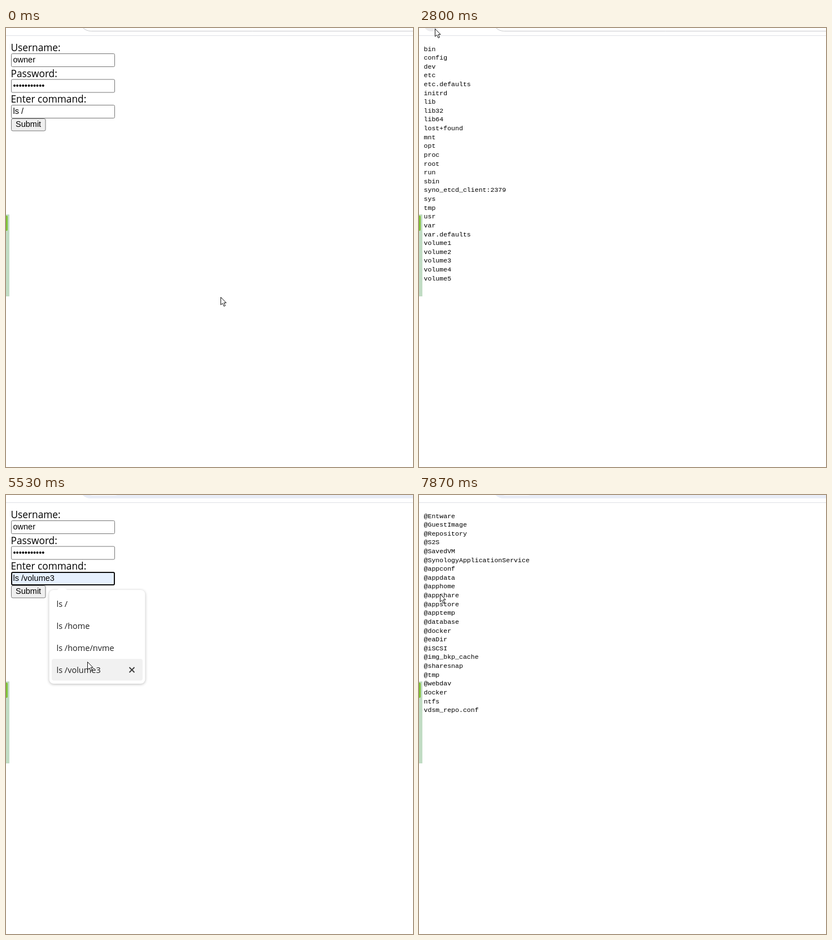
Animation, 721 px wide and 777 px high, one loop 8 s. Source, as an HTML page with a canvas:

```html
<!DOCTYPE html>
<html lang="en">
<head>
<meta charset="utf-8">
<title>Remote command form</title>
<style>
  html, body { margin: 0; width: 721px; height: 777px; overflow: hidden; background: #fff; }
  canvas { display: block; }
</style>
</head>
<body>
<canvas width="721" height="777"></canvas>
<script>
const ctx = document.querySelector('canvas').getContext('2d');
const LOOP = 8000;
const LABEL = '17.3px "Open Sans", sans-serif';
const MENU = '14.5px "Open Sans", sans-serif';
const FIELD = '14.5px "Liberation Sans", sans-serif';
const LISTING = '11.57px "Liberation Mono", monospace';

const rootListing = `bin config dev etc etc.defaults initrd lib lib32 lib64 lost+found mnt opt
  proc root run sbin syno_etcd_client:2379 sys tmp usr var var.defaults
  volume1 volume2 volume3 volume4 volume5`.split(/\s+/);
const volumeListing = `@Entware @GuestImage @Repository @S2S @SavedVM @SynologyApplicationService
  @appconf @appdata @apphome @appshare @appstore @apptemp @database @docker @eaDir @iSCSI
  @img_bkp_cache @sharesnap @tmp @webdav docker ntfs vdsm_repo.conf`.split(/\s+/);
const suggestions = ['ls /', 'ls /home', 'ls /home/nvme', 'ls /volume3'];

// Pointer stops: time, x, y
const pointerPath = [
  [0, 380, 476], [530, 37, 168], [800, 37, 168], [870, 40, 168], [1670, 40, 168],
  [1870, 75, 278], [2070, 60, 64], [2730, 60, 64], [2800, 28, 1], [2930, 28, 1],
  [3200, 110, 87], [3330, 110, 87], [3600, 100, 101], [3730, 98, 116], [3870, 98, 116],
  [4130, 104, 150], [5000, 104, 150], [5530, 144, 295], [5870, 140, 315], [6130, 140, 315],
  [6530, 36, 177], [6870, 36, 177], [6930, 37, 175], [LOOP, 37, 175]
];

function pointerAt(t) {
  const i = pointerPath.findIndex(stop => stop[0] > t);
  const [t0, x0, y0] = pointerPath[i - 1], [t1, x1, y1] = pointerPath[i];
  const u = (t - t0) / (t1 - t0), ease = u * u * (3 - 2 * u);
  return [x0 + (x1 - x0) * ease, y0 + (y1 - y0) * ease];
}

function text(string, x, y, font, color = '#000') {
  ctx.font = font;
  ctx.fillStyle = color;
  ctx.fillText(string, x, y);
}

function box(x, y, w, h, radius, fill, stroke, lineWidth = 1) {
  ctx.beginPath();
  ctx.roundRect(x, y, w, h, radius);
  if (fill) { ctx.fillStyle = fill; ctx.fill(); }
  if (stroke) { ctx.strokeStyle = stroke; ctx.lineWidth = lineWidth; ctx.stroke(); }
}

function drawChrome(t) {
  if (t >= 2800 && t < 3070) box(8, -22, 28, 28, 14, '#ececee');
  if (t < 2930) {
    box(130.5, -40, 700, 45.5, 20, '#fff', '#c8c9cc');
  } else {
    box(130, -40, 700, 46, 20, '#e9edf7');
    box(140, -28, 66, 29, 14, '#fff');
  }
  box(0, 13, 721, 1, 0, '#dfe1e5');
  box(0, 330, 6, 145, 0, '#c1dcc4');
  box(-4, 332, 7, 27, 2, '#80c337');
}

function drawField(y, value, focused, fill = '#fff', caret = false) {
  if (focused) box(10, y + 1, 182, 22, 2, fill, '#101010', 2);
  else box(9.5, y + .5, 183, 23, 2, fill, '#767676');
  text(value, 12.5, y + 16, FIELD);
  if (caret) box(13 + ctx.measureText(value).width, y + 3, 1, 17, 0, '#000');
}

function drawMenu(alpha, hovered) {
  ctx.save();
  ctx.globalAlpha = alpha;
  ctx.shadowColor = 'rgba(0,0,0,.28)';
  ctx.shadowBlur = 5;
  ctx.shadowOffsetY = 1;
  box(76.5, 168, 170, 166, 8, '#fff');
  ctx.shadowColor = 'transparent';
  ctx.beginPath();
  ctx.moveTo(91, 168);
  ctx.lineTo(99.5, 160);
  ctx.lineTo(108, 168);
  ctx.fill();
  suggestions.forEach((command, i) => {
    const top = 173 + 39 * i;
    if (i === hovered) {
      box(81, top, 161, 38.5, 4, '#f1f1f1');
      const y = top + 19.5;
      ctx.beginPath();
      ctx.moveTo(218.5, y - 4.5); ctx.lineTo(227.5, y + 4.5);
      ctx.moveTo(227.5, y - 4.5); ctx.lineTo(218.5, y + 4.5);
      ctx.strokeStyle = '#3c3c3c';
      ctx.lineWidth = 1.8;
      ctx.stroke();
    }
    text(command, 89.5, top + 25, MENU, '#1f1f1f');
  });
  ctx.restore();
}

function drawForm(t, [px, py]) {
  const menuOpen = t >= 4270 && t < 6200;
  const hovered = menuOpen && py >= 173 ? Math.floor((py - 173) / 39) : -1;
  const chosen = t >= 6200;
  const passwordEmpty = t >= 2930 && t < 3870;
  const passwordFocused = t >= 3530 && t < 4270;
  const commandFocused = t >= 4270 || (t >= 300 && t < 670);
  const command = hovered >= 0 ? suggestions[hovered] : chosen ? suggestions[3] : 'ls /';

  text('Username:', 8.5, 41, LABEL);
  drawField(45, 'owner');
  text('Password:', 8.5, 87, LABEL);
  drawField(90.5, passwordEmpty ? '' : '•'.repeat(11), passwordFocused, '#fff', passwordFocused && t < 4030);
  text('Enter command:', 8.5, 132, LABEL);
  const caretOn = (t >= 6200 && t < 6730) || (t >= 7230 && t < 7730);
  drawField(136, command, commandFocused, hovered >= 0 || chosen ? '#e6f0fe' : '#fff', caretOn);

  const overButton = px >= 9 && px <= 70 && py >= 160 && py <= 182;
  const pressed = t >= 670 && t < 730;
  box(9.5, 160.5, 60.5, 21.5, 2.5, pressed ? '#f5f5f5' : overButton ? '#e5e5e5' : '#efefef', '#767676');
  text('Submit', 17, 175, FIELD);
  if (menuOpen) drawMenu(Math.min(1, (t - 4200) / 270), hovered);
}

function drawListing(lines) {
  lines.forEach((line, i) => text(line, 8.5, 40.5 + 15.62 * i, LISTING));
}

function drawPointer([x, y]) {
  ctx.save();
  ctx.translate(Math.round(x) + .5, Math.round(y) + .5);
  ctx.fillStyle = '#fff';
  ctx.strokeStyle = '#111';
  ctx.lineWidth = 1;
  const arrow = new Path2D('M0 0V13.5L3.2 10.7 5.6 16 8 15 5.6 9.9H9.6Z');
  ctx.fill(arrow);
  ctx.stroke(arrow);
  ctx.restore();
}

function draw(now) {
  const tick = Math.floor((now % LOOP) * .015 + .06) % 120;
  const t = Math.round(tick * 100 / 15) * 10;
  const pointer = pointerAt(t);
  ctx.fillStyle = '#fff';
  ctx.fillRect(0, 0, 721, 777);
  drawChrome(t);
  if (t >= 7730) drawListing(volumeListing);
  else if (t >= 1200 && t < 2930) drawListing(rootListing);
  else drawForm(t, pointer);
  drawPointer(pointer);
}

const start = performance.now();
function loop() {
  draw(performance.now() - start);
  requestAnimationFrame(loop);
}
loop();
</script>
</body>
</html>
```
